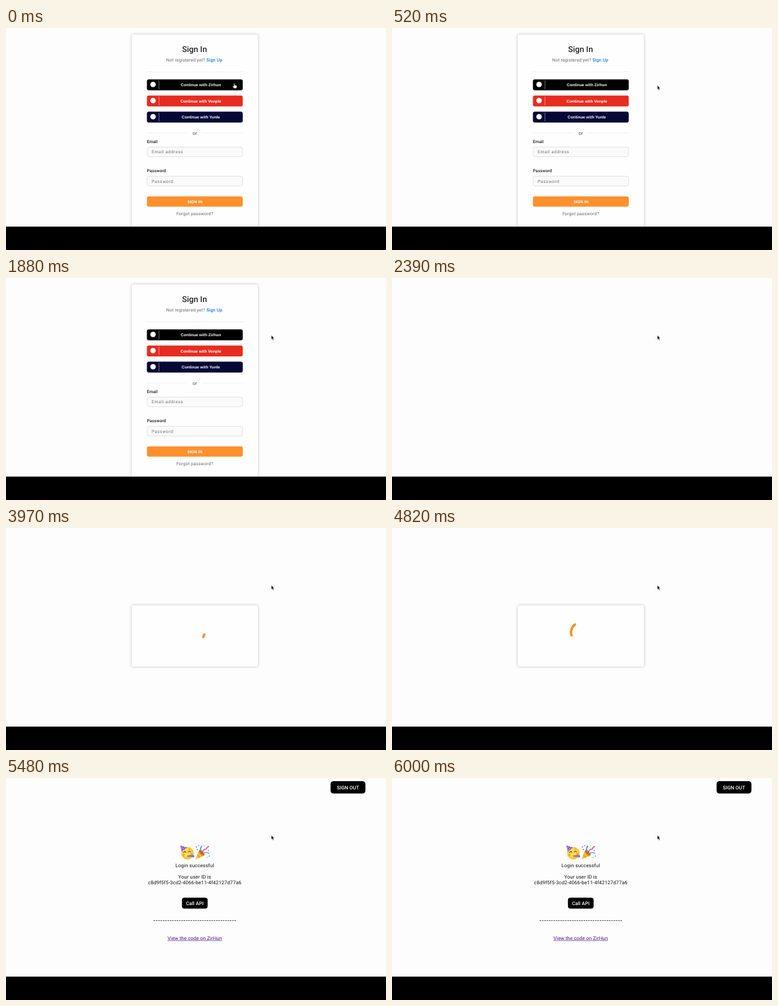
Animation of 600x351 px, one loop 6.03 s. Source, as an HTML page:

```html
<!DOCTYPE html>
<html lang="en">
<head>
<meta charset="utf-8">
<title>Sign in flow</title>
<style>
  html, body { margin: 0; width: 100%; height: 100%; overflow: hidden; background: #fdfdfd; }
  svg { display: block; width: 100vw; height: 100vh; }
  text { font-family: Roboto, sans-serif; text-rendering: geometricPrecision; }
  .card { fill: #fefefe; filter: drop-shadow(0 0 2px rgba(0, 0, 0, .26)); }
  .mid { text-anchor: middle; }
  .med { font-weight: 500; }
  .btn { font: bold 6.35px "Liberation Sans", Arial, sans-serif; fill: #fff; text-anchor: middle; }
  .note { font-size: 6.95px; letter-spacing: .18px; fill: #666; }
  .label { font-size: 6.75px; font-weight: 500; fill: #222; }
  .field { fill: #fafafa; stroke: #dcdcdc; stroke-width: .8; }
  .hint { font-size: 6.8px; letter-spacing: .55px; fill: #707070; }
  .rule { stroke: #ededed; stroke-width: .8; }
  .body { font-size: 7.8px; letter-spacing: .13px; fill: #111; }
  .dashes { font: 10px "Liberation Sans", Arial, sans-serif; letter-spacing: .32px; fill: #111; }
  .link { letter-spacing: .06px; fill: #4b1a8b; }
  .dark { font-size: 7.8px; font-weight: 500; fill: #fff; text-anchor: middle; }
</style>
</head>
<body>
<svg viewBox="0 0 600 351" preserveAspectRatio="none">
  <rect width="600" height="351" fill="#fdfdfd"/>

  <g id="login">
    <rect class="card" x="198.5" y="10.3" width="199.3" height="330" rx="3"/>
    <text class="mid med" x="297.7" y="38.2" font-size="12.8" fill="#222">Sign In</text>
    <text class="note mid" x="297.3" y="53">Not registered yet? <tspan class="med" fill="#1677f5">Sign Up</tspan></text>
    <path class="rule" d="M222 69.3H375"/>
    <g id="providers"></g>
    <path class="rule" d="M222 166H286M309 166H374"/>
    <text class="mid" x="298" y="168.8" font-size="7.8" fill="#555">or</text>
    <g id="fields"></g>
    <rect x="222.5" y="266.2" width="151.3" height="16.4" rx="3" fill="#ff902c"/>
    <text class="btn" x="298.2" y="276.7">SIGN IN</text>
    <text class="note mid" x="298" y="295.5" fill="#555">Forgot password?</text>
  </g>

  <g id="loading">
    <rect class="card" x="198.5" y="122.3" width="199.3" height="96.7" rx="3"/>
    <g transform="translate(298 165) scale(.77)">
      <circle id="ring" r="20" fill="none" stroke="#f8922a" stroke-width="4.9" stroke-linecap="round"/>
    </g>
  </g>

  <g id="done">
    <rect x="512.5" y="5" width="55" height="19.6" rx="4.5"/>
    <text class="dark" x="540" y="17.5">SIGN OUT</text>

    <g id="partyFace">
      <circle cx="286.6" cy="119" r="10" fill="#fdc52f"/>
      <circle cx="285.6" cy="117.4" r="7.4" fill="#ffd955"/>
      <path d="M275.2 106.6L286.2 110.2Q280.5 111.6 277.8 117.2Z" fill="#7a58c9"/>
      <path d="M278.4 107.8L277 112.2M282.2 109.2L278 114.6" stroke="#e8b1f0" stroke-width="1"/>
      <path d="M280.3 117.8q1.9-2.6 3.8-.4M287.5 117q1.9-2.5 3.8-.2" fill="none" stroke="#613a17" stroke-width="1.1" stroke-linecap="round"/>
      <path d="M279.6 114q1.6-1.5 3-1M288 112.6q1.6-.8 3 .6" fill="none" stroke="#8b5a1a" stroke-width=".7"/>
      <circle cx="280.4" cy="121.4" r="1.7" fill="#f79a42"/>
      <circle cx="292.4" cy="119.8" r="1.6" fill="#f79a42"/>
      <path d="M286.2 122.6L295.2 121.4Q298.3 122.5 296.6 125.2Q294.7 126.4 293.6 124.4L286.6 124.8Z" fill="#5b7fd6"/>
      <path d="M289 122.3v2.3M292 121.9v2.4" stroke="#e85a9b" stroke-width=".9"/>
    </g>

    <g id="popper">
      <path d="M299.4 128.6L305 113.8Q311.5 116.5 313.3 122.6Z" fill="#fcbf2e"/>
      <path d="M302.2 121.4L306.4 126M304 116.6L310.4 124" stroke="#e98a24" stroke-width="1.3"/>
      <ellipse cx="309.2" cy="118.1" rx="5.8" ry="2.4" transform="rotate(46 309.2 118.1)" fill="#b9731f"/>
      <path d="M308.4 116.6Q305.6 111.5 309.4 107.4" fill="none" stroke="#4a8ee8" stroke-width="1.7"/>
      <path d="M310 118Q311 112.4 316.6 112.2Q317 108.8 320.6 108.2" fill="none" stroke="#e6468a" stroke-width="1.6"/>
      <path d="M311.4 119.6Q315.4 116 321 119.4" fill="none" stroke="#57aee8" stroke-width="1.6"/>
      <g id="confetti"></g>
    </g>

    <text class="body mid" x="298" y="141.1">Login successful</text>
    <text class="body mid" x="298" y="159.3">Your user ID is</text>
    <text class="body mid" x="298" y="168.4">c8d9f5f5-3cd2-4066-be11-4f42127d77a6</text>
    <rect x="277.8" y="189.2" width="40.6" height="17.4" rx="4"/>
    <text class="dark" x="298.1" y="200.8">Call API</text>
    <text class="dashes mid" id="dashes" x="298.3" y="228.2"></text>
    <text class="body link mid" x="298" y="255.6">View the code on ZirHun</text>
    <path d="M255 257H341" stroke="#4b1a8b" stroke-width=".7"/>
  </g>

  <rect y="314" width="600" height="37"/>

  <g id="pointer">
    <path id="arrow" d="M0 0V6.6L1.5 5.3L2.6 7.8L3.8 7.3L2.7 4.9H4.7Z" stroke="#fff" stroke-width=".5"/>
    <path id="hand" d="M-.7 .6Q0-.4 .7 .6V3.2Q1.5 2.6 2 3.4Q2.8 3 3.2 3.8Q4.2 3.5 4.2 4.7V6.2L3.4 8.4H-.4L-2.6 5.2Q-2.6 4-1.4 4.5L-.7 5.2Z" fill="#fff" stroke="#000" stroke-width=".5"/>
  </g>
</svg>

<script>
const LOOP = 6030, BLANK = 2390, LOAD = 3970, DONE = 5000;
const MOVE = [120, 500];
const $ = id => document.getElementById(id);

$('providers').innerHTML = [['Zirhun', '#000'], ['Vonple', '#e82c20'], ['Yunle', '#050735']]
  .map(([name, color], i) => `<g transform="translate(0 ${81.2 + i * 25.55})">
    <rect x="222.5" width="151.3" height="17.2" rx="3" fill="${color}"/>
    <circle cx="232.2" cy="8" r="4.3" fill="#fff"/>
    <path d="M241.6 1.5V15.6" stroke="#fff" stroke-opacity=".6" stroke-width=".7"/>
    <text class="btn" x="307.6" y="10.8">Continue with ${name}</text></g>`).join('');

$('fields').innerHTML = [['Email', 'Email address'], ['Password', 'Password']]
  .map(([label, hint], i) => `<g transform="translate(0 ${i * 46.2})">
    <text class="label" x="222.5" y="181.9">${label}</text>
    <rect class="field" x="222.8" y="188.2" width="150.8" height="15.4" rx="3"/>
    <text class="hint" x="230" y="198.4">${hint}</text></g>`).join('');

$('confetti').innerHTML = [[300.6, 109], [304, 106.8], [313, 107.2], [319.4, 114.6], [321, 123.4], [317.4, 125.6], [302.2, 113]]
  .map(([x, y], i) => `<circle cx="${x}" cy="${y}" r=".9" fill="${['#e6468a', '#4a8ee8', '#f5a623'][i % 3]}"/>`).join('');

$('dashes').textContent = '-'.repeat(36);

const clamp = x => Math.min(1, Math.max(0, x));
const ease = x => x * x * (3 - 2 * x);
const show = (id, on) => $(id).setAttribute('display', on ? 'inline' : 'none');

// Two-second turn combined with a 1.5 s dash cycle that grows, then slides
function spin(s) {
  const x = s % 1.5 / .75;
  const length = 1 + 88 * Math.min(x, 1);
  const offset = x < 1 ? 35 * x : 35 + 89 * (x - 1);
  $('ring').setAttribute('stroke-dasharray', `${length} 200`);
  $('ring').setAttribute('stroke-dashoffset', -offset);
  $('ring').setAttribute('transform', `rotate(${s * 180})`);
}

function draw(t) {
  show('login', t < BLANK);
  show('loading', t >= LOAD && t < DONE);
  show('done', t >= DONE);
  if (t >= LOAD) spin(.038 + 1.48 * (t - LOAD) / 1000);

  const k = ease(clamp((t - MOVE[0]) / (MOVE[1] - MOVE[0])));
  const x = 360.4 + 58.6 * k, y = 87.2 + 3.4 * k;
  $('pointer').setAttribute('transform', `translate(${x} ${y})`);
  show('hand', x < 374);
  show('arrow', x >= 374);
}

const start = performance.now();
function tick() {
  draw((performance.now() - start) % LOOP);
  requestAnimationFrame(tick);
}
draw(0);
requestAnimationFrame(tick);
</script>
</body>
</html>
```
